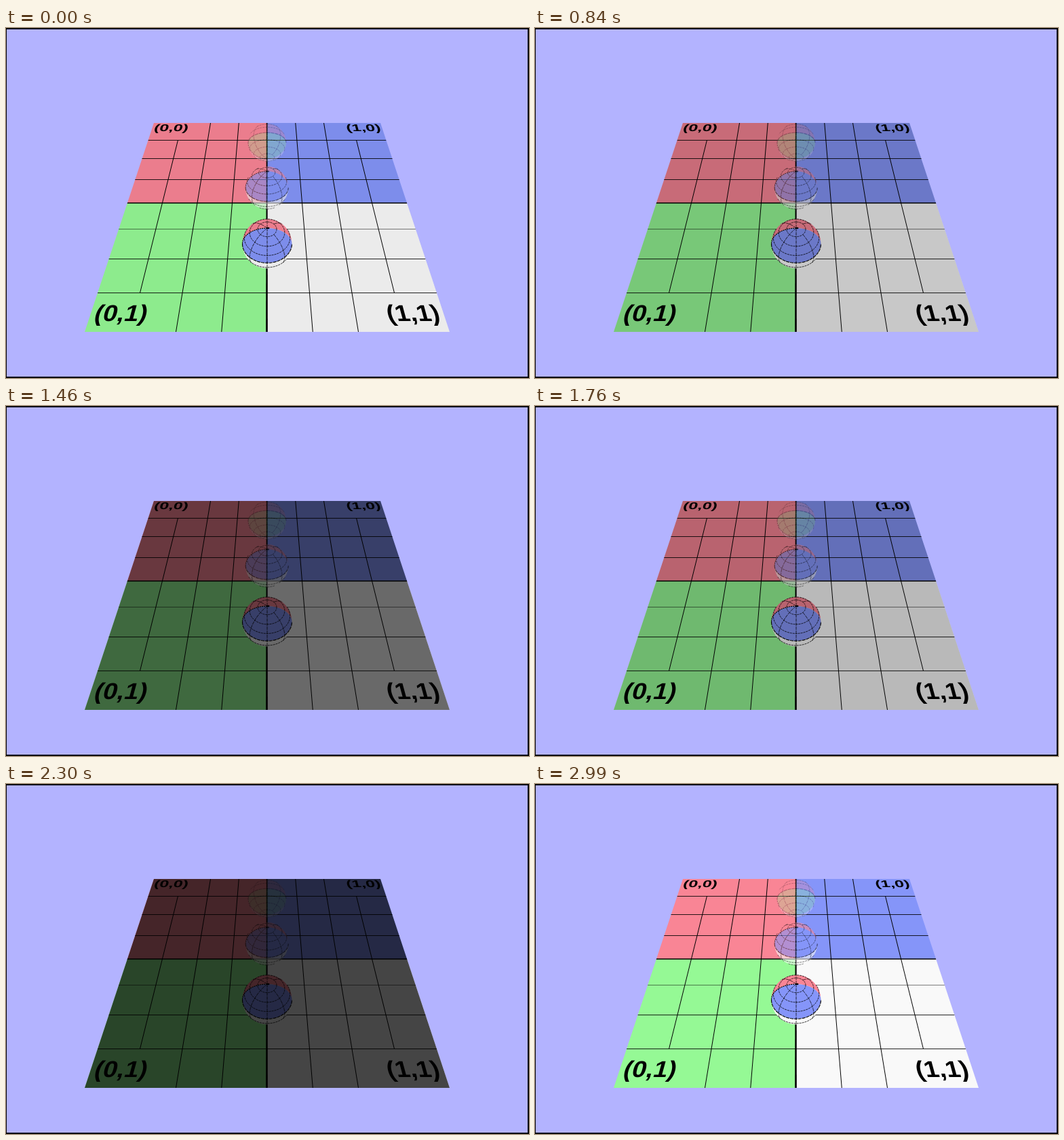
An HTML page for the animation above (3.07 s loop, 771 px wide and 516 px high).

```html
<!DOCTYPE html>
<html lang="en">
<head>
<meta charset="utf-8">
<title>Texture plane and spheres</title>
<style>
html, body { margin: 0; width: 100%; height: 100%; overflow: hidden; background: #b3b3ff; }
svg { display: block; }
text { font: bold 20px "Liberation Sans", Arial, sans-serif; text-anchor: middle; }
</style>
</head>
<body>
<svg id="stage" width="771" height="516" viewBox="0 0 771 516"></svg>
<script>
const RED = '#f89', GREEN = '#9f9', BLUE = '#89f', WHITE = '#fff';
const stage = document.getElementById('stage');

function add(parent, tag, attrs, text) {
  const el = document.createElementNS('http://www.w3.org/2000/svg', tag);
  for (const key in attrs) el.setAttribute(key, attrs[key]);
  if (text) el.textContent = text;
  return parent.appendChild(el);
}

// Perspective plane: texture coordinates (u, v) to the stage
const TOP = 140, FAR = 334, NEAR = 538, CX = 385;
const RISE = 308 / (NEAR - FAR);
const FALL = 1 / FAR - 1 / NEAR;
const widthAt = v => 1 / (1 / FAR - FALL * v);
const plane = (u, v) => {
  const w = widthAt(v);
  return [CX + (u - 0.5) * w, TOP + (w - FAR) * RISE];
};
const quad = (u0, v0, u1, v1) =>
  [plane(u0, v0), plane(u1, v0), plane(u1, v1), plane(u0, v1)].join(' ');

function drawPlane() {
  add(stage, 'polygon', { points: quad(0, 0, 0.5, 0.5), fill: RED });
  add(stage, 'polygon', { points: quad(0.5, 0, 1, 0.5), fill: BLUE });
  add(stage, 'polygon', { points: quad(0, 0.5, 0.5, 1), fill: GREEN });
  add(stage, 'polygon', { points: quad(0.5, 0.5, 1, 1), fill: WHITE });

  for (let k = 1; k < 8; k++) {
    if (k === 4) continue;
    const t = k / 8;
    const inset = k === 1 || k === 7 ? 1 / 8 : 0;
    const [x1, y1] = plane(t, inset), [x2, y2] = plane(t, 1 - inset);
    add(stage, 'line', { x1, y1, x2, y2, stroke: '#000' });
    const [left, y] = plane(0, t), [right] = plane(1, t);
    const row = Math.floor(y) + 0.5;
    add(stage, 'line', { x1: left, y1: row, x2: right, y2: row, stroke: '#000',
      'stroke-opacity': k === 5 ? 0.5 : 0.85 });
  }
  add(stage, 'polygon', { points: quad(0.4965, 0, 0.5015, 1) });
  add(stage, 'polygon', { points: quad(0, 0.4975, 1, 0.503) });

  label('(0,0)', 0.083, 0.061);
  label('(1,0)', 0.9185, 0.061);
  label('(0,1)', 0.087, 0.968);
  label('(1,1)', 0.913, 0.968);
}

// Text lies in the plane, using the local slope of the perspective
function label(text, u, v) {
  const w = widthAt(v - 0.02), stretch = FALL * w * w, em = 0.0725 / 20;
  const [x, y] = plane(u, v);
  const m = [w * em, 0, (u - 0.5) * stretch * em, RISE * stretch * em, x, y];
  add(stage, 'text', { transform: `matrix(${m})` }, text);
}

// Sphere seen from above at the given tilt; inside shows the far inner wall
function drawSphere(cx, cy, r, degrees, opacity, inside) {
  const tilt = degrees * Math.PI / 180, c = Math.cos(tilt), s = Math.sin(tilt);
  const g = add(stage, 'g', { transform: `translate(${cx} ${cy})`, opacity });
  const upper = r * (inside ? s : c), lower = r * (inside ? c : s);
  const band = (a, b, sweepA, sweepB, fill) => add(g, 'path', {
    d: `M${-r} 0A${r} ${a} 0 0 ${sweepA} ${r} 0A${r} ${b} 0 0 ${sweepB} ${-r} 0Z`, fill });
  band(r, upper, 1, 0, RED);
  band(upper, lower, 1, 1, inside ? GREEN : BLUE);
  band(lower, r, 0, 1, WHITE);

  const curve = (point, width, dash) => {
    let d = '', drawing = false;
    for (let i = 0; i <= 96; i++) {
      const [u, v] = point(i / 96);
      const a = 2 * Math.PI * u, ring = Math.sin(Math.PI * v);
      const x = ring * Math.cos(a), y = Math.cos(Math.PI * v), z = -ring * Math.sin(a);
      const depth = y * s + z * c;
      const visible = inside ? depth < 0.001 : depth > -0.001;
      if (visible) {
        d += (drawing ? 'L' : 'M') + (r * x).toFixed(2) + ' ' + (r * (z * s - y * c)).toFixed(2);
      }
      drawing = visible;
    }
    if (d) add(g, 'path', { d, fill: 'none', stroke: '#000', 'stroke-width': width,
      'stroke-dasharray': dash });
  };
  for (let k = 1; k < 8; k++) {
    const t = k / 8, main = k === 4;
    const inset = k === 1 || k === 7 ? 1 / 8 : 0;
    curve(p => [t, inset + p * (1 - 2 * inset)], main ? 1.1 : 0.8, main ? '2 1' : '5 1');
    curve(p => [p, t], main ? 1.1 : 0.8, main ? '5 1' : '3 1');
  }
  if (!inside) add(g, 'ellipse', { cx: 1.5, cy: -c * r, rx: 2, ry: 1.2 });
}

add(stage, 'rect', { width: 771, height: 516, fill: '#000' });
add(stage, 'rect', { x: 1, y: 2, width: 768, height: 512, fill: '#b3b3ff' });
drawPlane();
drawSphere(385, 169, 28, 32, 0.28, true);
drawSphere(384.7, 235.5, 31.5, 40, 0.6, false);
drawSphere(385, 318, 36.5, 51, 1, false);
const shade = add(stage, 'polygon', { points: quad(0, 0, 1, 1) });

// Brightness climbs in steps and wraps back to black
const LOOP = 3070, STEPS = 40;
const stepStart = n => n ? Math.round((70 + (n - 1) * 76.9) / 10) * 10 : 0;

function draw(time) {
  const t = time % LOOP;
  let n = 0;
  while (n + 1 < STEPS && stepStart(n + 1) <= t) n++;
  const light = (235 + 19.98 * n) % 255;
  shade.setAttribute('opacity', 1 - light / 255);
}

const begin = performance.now();
function tick() {
  draw(performance.now() - begin);
  requestAnimationFrame(tick);
}
tick();
</script>
</body>
</html>
```
